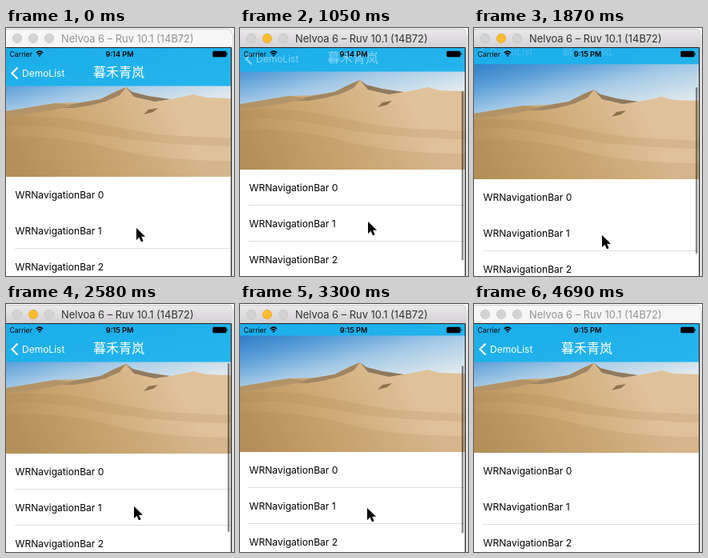
Animation of 285 by 310 pixels, one loop 4.79 s. Source, as an HTML page:

```html
<!DOCTYPE html>
<html lang="en">
<head>
<meta charset="utf-8">
<style>
html, body { margin: 0; width: 100%; height: 100%; overflow: hidden; background: #fff; }
svg { display: block; width: 285px; height: 310px; font-family: Inter, sans-serif; }
</style>
</head>
<body>
<svg viewBox="0 0 285 310">
  <defs>
    <linearGradient id="chrome" x2="0" y2="1"><stop stop-color="#ebe9eb"/><stop offset="1" stop-color="#d3d1d3"/></linearGradient>
    <linearGradient id="sky" gradientUnits="userSpaceOnUse" x1="0" y1="38" x2="25" y2="144"><stop stop-color="#2a7bc5"/><stop offset=".3" stop-color="#5a9ed8"/><stop offset=".6" stop-color="#a4c9e6"/><stop offset="1" stop-color="#dfe9ee"/></linearGradient>
    <linearGradient id="sand" gradientUnits="userSpaceOnUse" x1="20" y1="190" x2="210" y2="95"><stop stop-color="#b7925d"/><stop offset=".45" stop-color="#cda873"/><stop offset="1" stop-color="#dfc19a"/></linearGradient>
    <clipPath id="screen"><path d="M0 24H281V310H0Z"/></clipPath>
  </defs>

  <path d="M283 8H285V310H283Z" fill="#e4e4e4"/>
  <path d="M282 8H283V310H282Z" fill="#bdbdbd"/>
  <path id="top" d="M0 1H277Q283 1 283 7V24H0Z"/>
  <path d="M0 1.500H277Q282.500 1.500 282.500 7" fill="none" stroke="#c9c9c9"/>
  <g fill="#d3d3d3" stroke="#bdbdbd" stroke-width=".6">
    <circle cx="14" cy="13" r="5.700"/><circle id="amber" cx="34" cy="13" r="5.700"/><circle cx="54" cy="13" r="5.700"/>
  </g>
  <text id="name" x="69" y="18" font-size="12.900">Nelvoa 6 – Ruv 10.1 (14B72)</text>

  <g clip-path="url(#screen)">
    <path d="M0 24H281V310H0Z" fill="#fff"/>
    <g id="list">
      <path d="M0 5H281V110H0Z" fill="url(#sky)"/>
      <path d="M0 104L22 102 42 97 62 94 95 93 118 89 136 80 150 74 158 80 178 85 205 89 222 86 234 83 250 87 281 88V186H0Z" fill="url(#sand)"/>
      <path d="M150 74L142 84 124 92 104 97 84 100 60 100 95 93 118 89 136 80Z" fill="#a08562"/>
      <path d="M150 74L158 80 178 85 205 89 186 92 160 86Z" fill="#8f7a60"/>
      <path d="M0 104L42 97 62 94 84 97 56 103 24 108 0 109Z" fill="#b39468"/>
      <path d="M172 108L178 102 190 100 184 105Z" fill="#8d734e"/>
      <g fill="#a8804a" fill-opacity=".18">
        <path d="M0 112Q60 108 108 118T200 134L281 138V148Q180 146 110 132T0 124Z"/>
        <path d="M0 136Q70 134 130 150T281 166V186H0Z"/>
      </g>
      <g id="rows" font-size="12.100"></g>
    </g>
    <rect id="thumb" x="277" width="2.500" rx="1.200" fill="#000" fill-opacity=".45"/>
    <g id="bar">
      <path d="M0 -10H281V72.500H0Z" fill="#1bb2ec" fill-opacity=".94"/>
      <g id="items" fill="#fff">
        <path d="M14.500 49.500L7.500 56.500 14.500 63.500" fill="none" stroke="#fff" stroke-width="2.200"/>
        <text x="20" y="61" font-size="12">DemoList</text>
        <text lang="zh-CN" x="109" y="61" font-size="16" font-family="Noto Sans CJK SC, Noto Sans CJK, sans-serif">暮禾青岚</text>
      </g>
    </g>
    <text x="4.500" y="36" font-size="8.700">Carrier</text>
    <path d="M37.800 31Q42 27.200 46.200 31M39.500 33Q42 30.800 44.500 33" fill="none" stroke="#000" stroke-width="1.500"/>
    <path d="M40.500 34.300Q42 33 43.500 34.300L42 36Z"/>
    <text id="clock" x="142" y="36" font-size="9.100" font-weight="600" text-anchor="middle"></text>
    <rect x="258.300" y="28.700" width="17.200" height="7.600" rx="1.500"/>
    <path d="M276 31Q278 32.500 276 34Z"/>
  </g>
  <path d="M0 24.500H281.500V310" fill="none" stroke="#222"/>
  <path id="mouse" d="M0 0V15L3.500 11.700 6 17.300 8.600 16.200 6.200 10.800H11Z" stroke="#fff" stroke-width="2" paint-order="stroke"/>
</svg>
<script>
const LOOP = 4790, START = 350, STEP = 117.5;
const get = id => document.getElementById(id);
const set = (id, attrs) => { for (const a in attrs) get(id).setAttribute(a, attrs[a]); };

// step, scroll offset, pointer x, pointer y
const keys = [
  [0, 0, 163, 250], [4, 0, 160, 252], [5, 3, 160, 250], [6, 9, 160, 242],
  [8, 22, 160, 231], [10, 22, 160, 231], [13, -3, 160, 259], [15, -5, 160, 263],
  [18, -5, 160, 263], [19, -1, 160, 253], [22, 10, 160, 242], [23, 10, 160, 242],
  [25, 1, 159, 255], [28, -3, 159, 263], [32, 0, 159, 320]
];
// steps at which the bar starts to hide, show, hide, show
const toggles = [4.64, 12.32, 19.3, 25.3];
const FADE = 300 / STEP;

const clamp = x => Math.min(1, Math.max(0, x));
const ease = x => x * x * (3 - 2 * x);

function pose(k) {
  let i = 0;
  while (i < keys.length - 2 && k > keys[i + 1][0]) i++;
  const a = keys[i], b = keys[i + 1], u = clamp((k - a[0]) / (b[0] - a[0]));
  return [1, 2, 3].map(n => Math.round(a[n] + (b[n] - a[n]) * u));
}

get('rows').innerHTML = [0, 1, 2].map(i =>
  `<text x="11.500" y="${212.5 + 45 * i}">WRNavigationBar ${i}</text>` +
  `<path id="line${i}" d="M11 ${230.5 + 45 * i}H281" stroke="#dedede"/>`).join('');

function draw(t) {
  const k = Math.floor((t - START + 8) / STEP);
  const [s, x, y] = pose(k);
  const active = k >= 0 && k < 37;
  const hidden = toggles.reduce((p, at, i) => p + (i % 2 ? -1 : 1) * ease(clamp((k - at) / FADE)), 0);

  set('top', { fill: active ? 'url(#chrome)' : '#f6f6f6' });
  set('amber', active ? { fill: '#fdbc2e', stroke: '#dea123' } : { fill: '#d3d3d3', stroke: '#bdbdbd' });
  set('name', { fill: active ? '#333' : '#929292' });
  set('list', { transform: `translate(0 ${-s})` });
  set('line0', { opacity: s > 0 || s % 3 ? 1 : 0 }); // hairline lost between pixels
  set('bar', { transform: `translate(0 ${-33 * hidden})` });
  set('items', { opacity: 1 - hidden });

  const head = s > 0 ? 77 + 0.2 * s : 74;
  const tail = 286 + s * (s > 0 ? 0.5 : 1.3);
  set('thumb', { y: head, height: tail - head, opacity: k < 5 ? 0 : clamp((32 - k) / 3) });
  set('mouse', { transform: `translate(${x} ${y})` });
  get('clock').textContent = k < 11 ? '9:14 PM' : '9:15 PM';
}

const begin = performance.now();
function tick() {
  draw((performance.now() - begin) % LOOP);
  requestAnimationFrame(tick);
}
tick();
</script>
</body>
</html>
```
